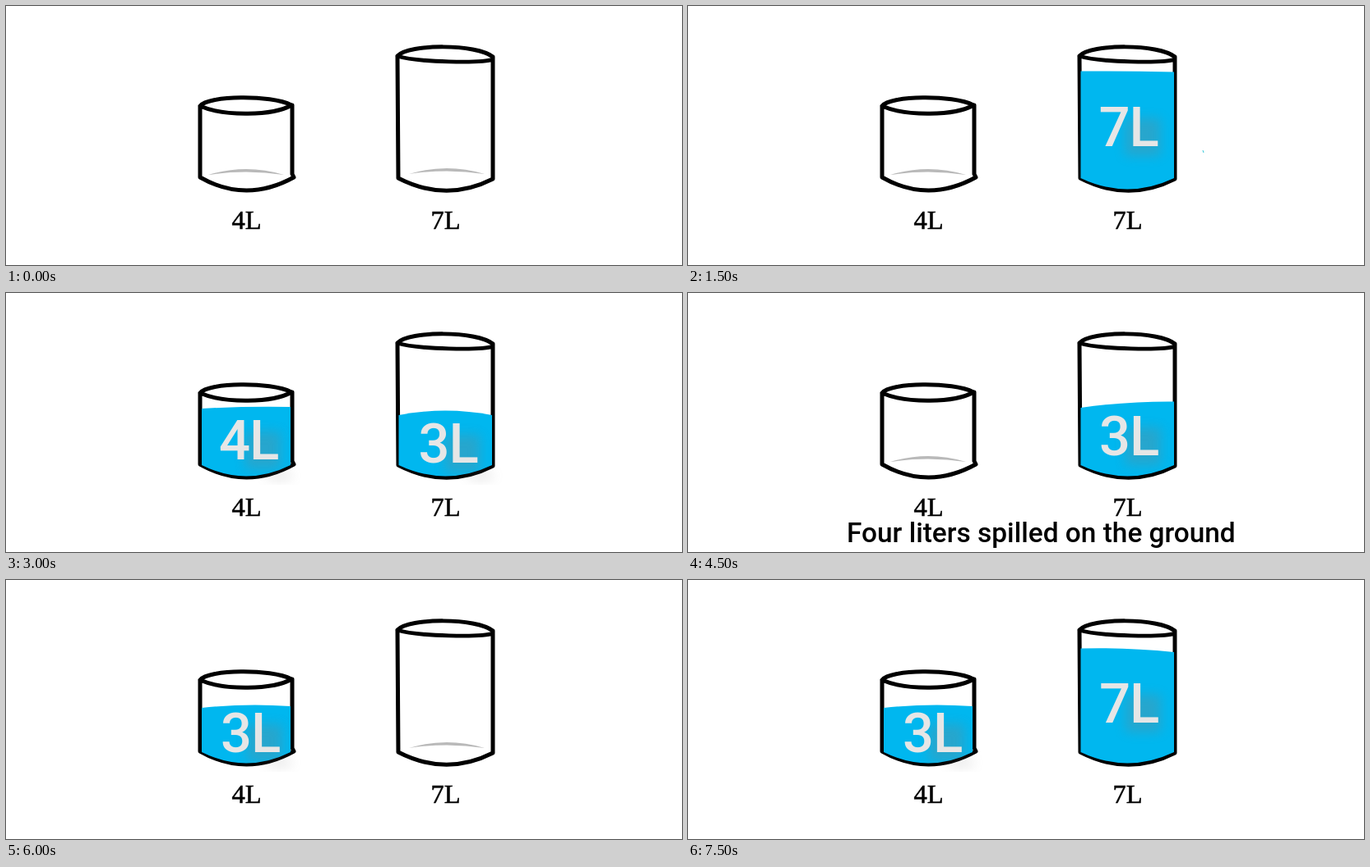
An HTML page that plays this animation: 822 px wide and 316 px high, repeating every 8 s.

```html
<!DOCTYPE html>
<html lang="en">
<head>
<meta charset="utf-8">
<title>Measuring water</title>
<style>
  html, body { margin: 0; width: 100%; height: 100%; overflow: hidden; background: #fff; }
  svg { display: block; width: 100%; height: 100%; }
  .ink { fill: none; stroke: #000; stroke-width: 5; stroke-linecap: round; stroke-linejoin: round; }
  .floor { fill: #b9b9b9; }
  .water { fill: #00b7ef; }
  .shade { fill: #808080; filter: url(#soft); }
  .label { font: 32.5px "Liberation Serif", serif; stroke: #000; stroke-width: .5; }
  .amount { font: 500 67px Roboto, sans-serif; letter-spacing: -1px; fill: #e6e6e6; }
  .caption { font: 500 33.4px Roboto, sans-serif; }
</style>
</head>
<body>
<svg viewBox="0 0 822 316">
  <defs>
    <filter id="soft" x="-60%" y="-60%" width="220%" height="220%" color-interpolation-filters="sRGB">
      <feGaussianBlur stdDeviation="7"/>
    </filter>
  </defs>
  <g id="floors"></g>
  <g class="ink">
    <path d="M236 122C246 109 322 108 347 121C325 134 265 135 236 122V209Q292 241 350 209L348 205V121"/>
    <path d="M476 61C490 46 572 46 592 62V65C580 70 500 69 476 61L477 210Q535 240 592 211V63"/>
  </g>
  <g id="contents"></g>
  <text class="label" x="274.500" y="271.500">4L</text>
  <text class="label" x="516.500" y="271.500">7L</text>
  <text class="caption" id="caption" x="193" y="303.500">Four liters spilled on the ground</text>
</svg>
<script>
const LOOP = 8000;
const jars = {
  small: { left: 238, right: 346, bottom: 210, floor: [246, 338, 206] },
  big: { left: 477.5, right: 591, bottom: 210, floor: [490, 582, 205] }
};

// surface: heights at left, control and right; text: words, x, baseline
const small4 = { surface: [141, 138, 139], text: ["4L", 259, 203], spill: true };
const small3 = { surface: [156, 150, 154], text: ["3L", 261, 210], spill: true };
const big7 = { surface: [79.5, 79.5, 80.5], text: ["7L", 499.5, 171], specks: true };
const big3 = { surface: [149, 138, 149], text: ["3L", 501.5, 207], spill: true };
const big3Tilted = { surface: [140, 132, 132.5], text: ["3L", 500, 198] };
const big7Refilled = { surface: [83.5, 82, 88], text: ["7L", 500, 174] };

const steps = [
  { at: 0 },
  { at: 1500, big: big7 },
  { at: 3000, small: small4, big: big3 },
  { at: 4500, big: big3Tilted, caption: true },
  { at: 6000, small: small3 },
  { at: 7500, small: small3, big: big7Refilled }
];

const byId = id => document.getElementById(id);

function floorLine([x1, x2, y]) {
  const mid = (x1 + x2) / 2;
  return `<path class="floor" d="M${x1} ${y}Q${mid} ${y - 14} ${x2} ${y}Q${mid} ${y - 7} ${x1} ${y}Z"/>`;
}

function filling(name, jar, fill) {
  const { left, right, bottom } = jar;
  const mid = (left + right) / 2;
  const [y1, yc, y2] = fill.surface;
  const [words, x, y] = fill.text;
  const body = `M${left} ${y1}Q${mid} ${yc} ${right} ${y2}V${bottom}Q${mid} ${bottom + 27} ${left} ${bottom}Z`;
  let out = "";
  if (fill.spill) out += `<ellipse class="shade" cx="${right - 14}" cy="223" rx="17" ry="5" opacity=".2"/>`;
  out += `<clipPath id="${name}"><path d="${body}"/></clipPath><path class="water" d="${body}"/>`;
  out += `<g clip-path="url(#${name})"><rect class="shade" x="${x + 32}" y="${y - 34}" width="43" height="46" opacity=".3"/></g>`;
  if (fill.specks) out += `<path d="M626 176l1 3" stroke="#39c9d9"/>`;
  return out + `<text class="amount" x="${x}" y="${y}">${words}</text>`;
}

function draw(step) {
  const names = Object.keys(jars);
  byId("floors").innerHTML = names.filter(n => !step[n]).map(n => floorLine(jars[n].floor)).join("");
  byId("contents").innerHTML = names.filter(n => step[n]).map(n => filling(n, jars[n], step[n])).join("");
  byId("caption").setAttribute("visibility", step.caption ? "visible" : "hidden");
}

let shown;
const start = performance.now();
function tick() {
  const time = (performance.now() - start) % LOOP;
  const step = steps.findLast(s => s.at <= time);
  if (step !== shown) draw(shown = step);
  requestAnimationFrame(tick);
}
tick();
</script>
</body>
</html>
```
